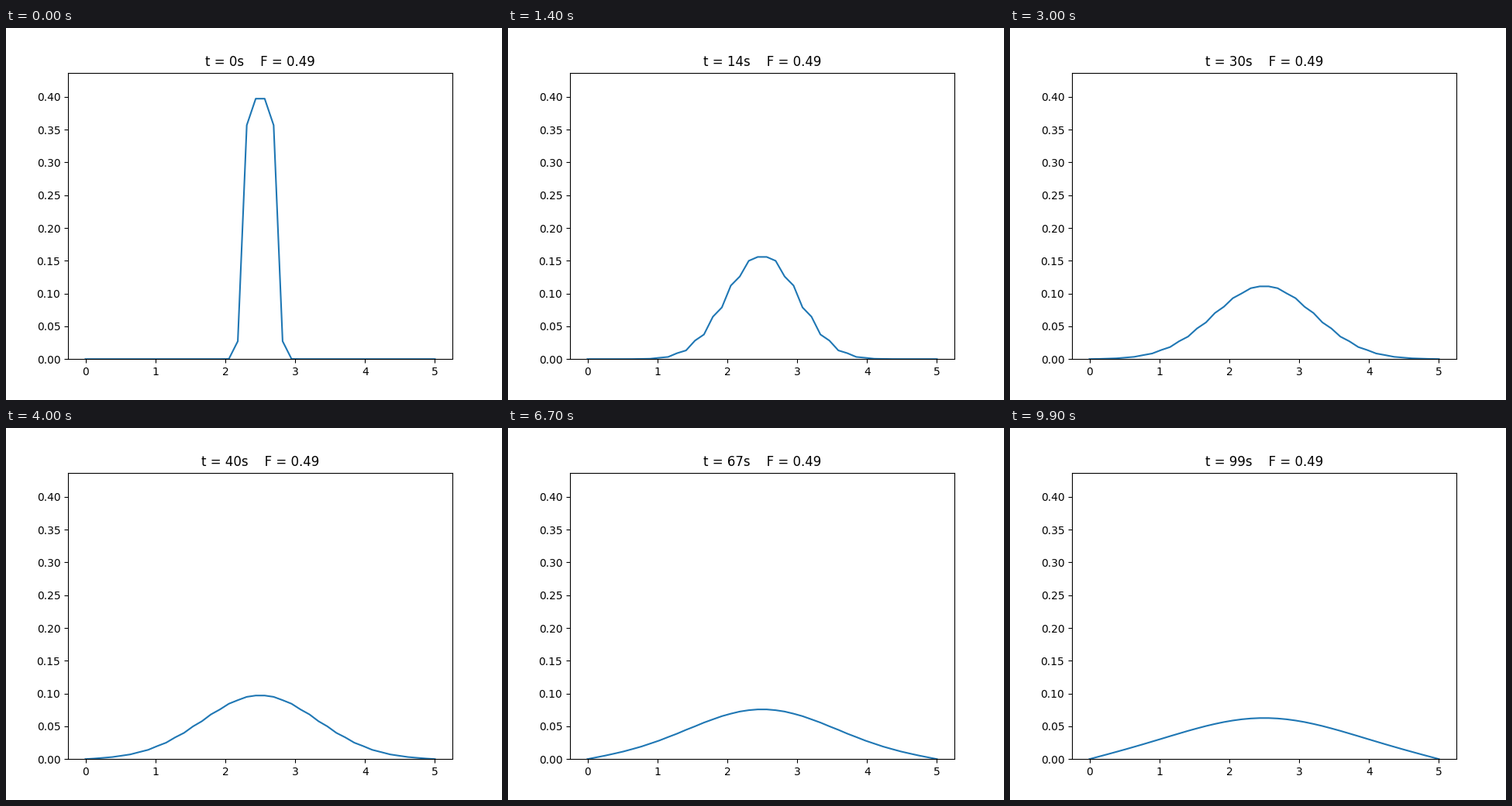
A matplotlib script for the animation above (10 s loop, 640x480 px).

```python
import numpy as np
import matplotlib.pyplot as plt
from matplotlib.animation import FuncAnimation

LENGTH = 5.0
POINTS = 40
STEPS = 100
F = 0.49        # Fourier number of the explicit scheme
SIGMA = 0.08    # width of the initial pulse


def diffuse(u):
    """One explicit diffusion step with both ends held at zero."""
    new = np.zeros_like(u)
    new[1:-1] = u[1:-1] + F * (u[2:] - 2 * u[1:-1] + u[:-2])
    return new


x = np.linspace(0, LENGTH, POINTS)
u = np.exp(-(x - LENGTH / 2) ** 2 / (2 * SIGMA ** 2))
history = []
for _ in range(STEPS):
    u = diffuse(u)
    history.append(u)

plt.rcParams["font.family"] = "DejaVu Sans"
fig, ax = plt.subplots(figsize=(6.4, 4.8), dpi=100)
line, = ax.plot(x, history[0])
ax.set_xlim(-0.05 * LENGTH, 1.05 * LENGTH)
ax.set_ylim(0, 1.1 * history[0].max())
title = ax.set_title("")


def update(step):
    line.set_ydata(history[step])
    title.set_text(f"t = {step}s    F = {F}")
    return line, title


anim = FuncAnimation(fig, update, frames=STEPS, interval=100,
                     repeat=True, repeat_delay=0, blit=False)
plt.show()
```
